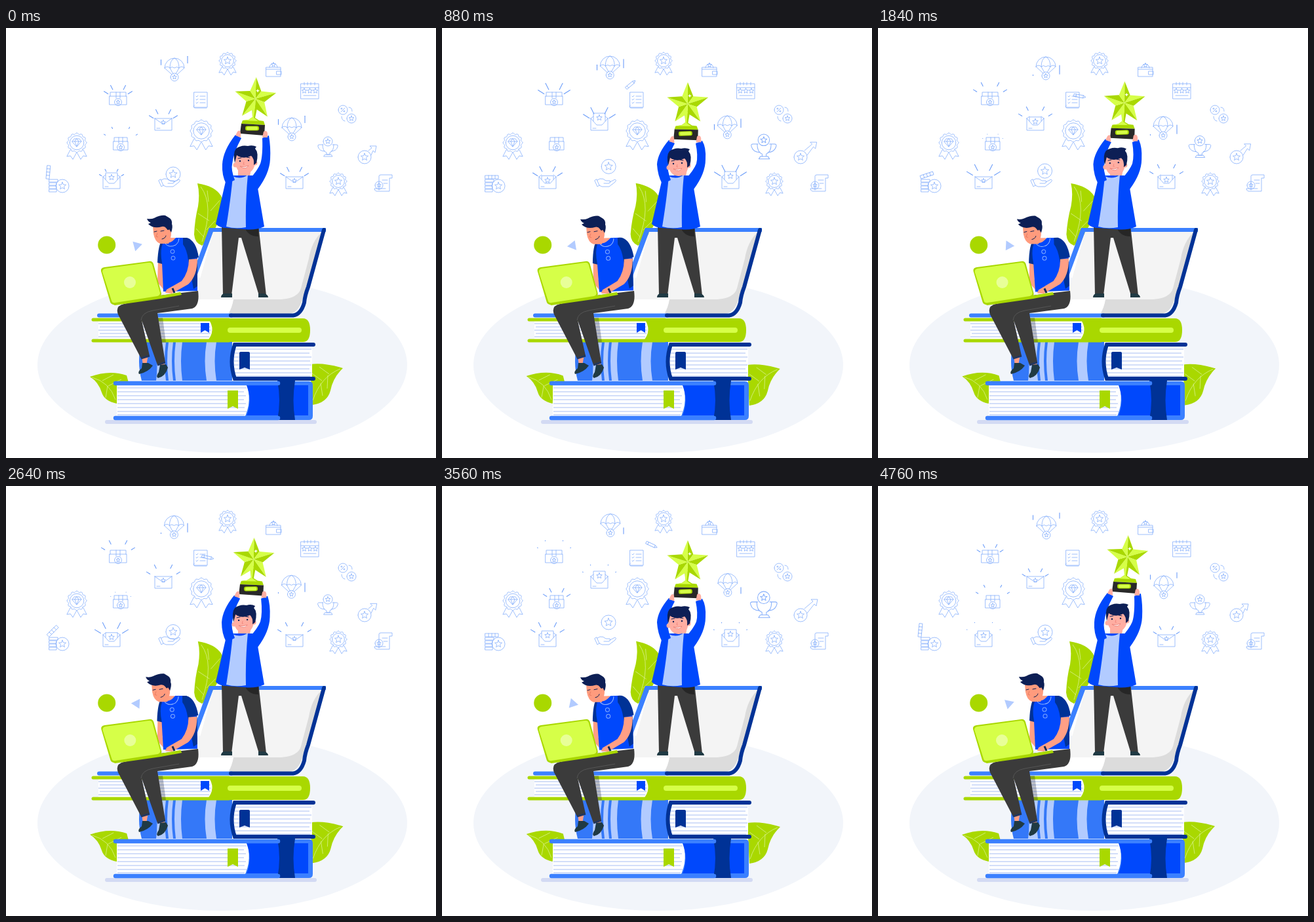
Recreate the animation shown at these times as an HTML page. Size 656 px wide and 656 px high, loop 4.8 s.

```html
<!DOCTYPE html>
<html lang="en">
<head>
<meta charset="utf-8">
<title>Learning rewards</title>
<style>
html, body { margin: 0; width: 100%; height: 100%; overflow: hidden; background: #fff; }
svg { display: block; width: 100vw; height: 100vh; }
.line { fill: none; stroke: #86affb; stroke-width: .8; stroke-linejoin: round; stroke-linecap: round; }
.ray { stroke: #6c9df9; stroke-width: 1.1; }
.blue { fill: #0048fc; } .sky { fill: #3b80ff; } .navy { fill: #003296; } .pale { fill: #b2cbff; }
.green { fill: #a9d800; } .lime { fill: #d6ff48; } .dark { fill: #3b3b3b; } .hair { fill: #0d1f55; }
.skin { fill: #ff9f85; } .pink { fill: #ffaea2; } .shoe { fill: #203a44; }
.rule { fill: none; stroke: #c5d4f8; stroke-width: 1.3; }
.vein { fill: none; stroke: #daf192; stroke-width: .8; }
.bar { fill: none; stroke-linecap: round; }
.pen { fill: none; stroke: #0d1f55; stroke-width: 1; stroke-linecap: round; }
</style>
</head>
<body>
<svg viewBox="0 0 656 656">
  <ellipse cx="330" cy="514" rx="282" ry="134" fill="#f2f5fa"/>

  <g id="leafTop">
    <path class="green" d="M292 237Q319 241 328 256Q338 275 322 300Q312 322 299 332Q288 328 287 315Q288 292 293 272Q296 252 292 237Z"/>
    <path class="vein" d="M297 242Q318 270 299 326M309 265L307 248M312 279L326 263M310 294L293 283M306 308L319 294M302 319L290 306"/>
  </g>
  <g id="leafLeft">
    <path class="green" d="M128 532Q158 521 184 530L187 541L170 545L169 573Q150 569 146 556Q141 540 128 532Z"/>
    <path class="vein" d="M131 533Q158 540 167 567M147 538L164 529M156 546L176 536M155 546L152 564"/>
  </g>
  <g id="leafRight">
    <path class="green" d="M514 519Q485 510 464 513L467 575Q490 572 495 553Q499 533 514 519Z"/>
    <path class="vein" d="M510 520Q480 532 468 568M493 528L478 517M482 538L467 527M491 530L490 550M480 542L483 561"/>
  </g>

  <path class="bar" d="M154 601H471" stroke="#d3daf3" stroke-width="6"/>

  <!-- bottom book -->
  <path fill="#fff" d="M169 543H370V594H169Z"/>
  <path class="rule" d="M170 549H367M170 555H363M170 561H366M170 567H363M170 573H366M170 579H364M170 585H367M170 590H364"/>
  <path class="sky" d="M365 539H462Q468 539 468 545V592Q468 598 462 598H362Q378 568 365 539Z"/>
  <path class="blue" d="M367 545H461V591H367Q376 568 367 545Z"/>
  <path class="navy" d="M414 538H441Q436 568 441 598H414Q420 568 414 538Z"/>
  <path class="bar" d="M167 542H415M167 595H415" stroke="#3b80ff" stroke-width="6.500"/>
  <path class="green" d="M338 553H354V581L346 577L338 581Z"/>

  <!-- middle book -->
  <path fill="#3478f8" d="M207 479H345V538H207Q199 508 207 479Z"/>
  <path class="pale" d="M226 479H244Q240 508 244 538H229Q233 508 226 479ZM248 479H255Q251 508 255 538H248Q244 508 248 479ZM259 479H269Q265 508 269 538H259Q255 508 259 479ZM306 479H321Q316 508 321 538H306Q301 508 306 479Z"/>
  <path fill="#fff" d="M345 484H467V533H345Z"/>
  <path class="rule" d="M348 490H466M348 496H463M348 502H466M348 508H464M348 514H466M348 520H463M348 526H466M348 531H464"/>
  <path class="bar" d="M469 483H349Q340 509 349 535H469" stroke="#003296" stroke-width="6"/>
  <path class="navy" d="M358 494H370Q372 494 372 496V521L364 518L356 521V496Q356 494 358 494Z"/>

  <!-- upper book -->
  <path fill="#fff" d="M141 446H316V476H141Z"/>
  <path class="rule" d="M141 451H310M143 456H312M141 461H313M143 466H312M141 471H310"/>
  <path class="green" d="M308 443H453Q464 443 464 461Q464 479 453 479H306Q322 461 308 443Z"/>
  <path class="bar" d="M133 445H340M133 477H340" stroke="#a9d800" stroke-width="5"/>
  <path class="bar" d="M342 461H447" stroke="#d6ff48" stroke-width="8"/>
  <path class="blue" d="M297 450H310V465L303.500 461L297 465Z"/>

  <!-- open book -->
  <path class="sky" d="M310 305H488V311H316L286 392L280 388Z"/>
  <path fill="#f4f4f4" d="M316 311H482L456 400Q447 414 425 416H345L285 422Z"/>
  <path fill="#dcdcdc" d="M482 311Q466 326 462 352L450 397Q446 412 420 414H346Q343 426 340 436H430Q446 436 453 412L484 314Z"/>
  <path fill="#fff" d="M285 414H347Q345 427 339 436H210Z"/>
  <path class="bar" d="M142 438.500H344" stroke="#3b80ff" stroke-width="6"/>
  <path class="bar" d="M343 438.500H438Q450 437 455 419Q456 408 461 395L485 308" stroke="#003296" stroke-width="6"/>

  <!-- winner -->
  <path class="dark" d="M329 300H385L397 408H386L359 320H355L344 408H331Z"/>
  <path fill="#262626" d="M365 306H385L385 318Q370 318 365 306Z"/>
  <path class="shoe" d="M332 405H345V411H328Q328 407 332 405ZM385 405H394Q400 407 400 411H385Z"/>
  <path class="pink" d="M354 215H374L371 232H354Z"/>
  <path class="blue" d="M336 230L348 225H376L383 238L394 303Q380 309 364 307L336 305Q326 305 320 299Z"/>
  <path class="pale" d="M346 226Q358 232 369 224Q365 265 366 304Q350 307 336 303Q343 260 346 226Z"/>
  <path id="arms" class="blue"/>
  <g id="winnerHead">
    <circle class="pink" cx="350" cy="209" r="3.500"/><circle class="pink" cx="380" cy="206" r="3.500"/>
    <path class="pink" d="M350 194H380V206Q378 221 365 222Q352 221 350 207Z"/>
    <path class="hair" d="M349 206Q346 190 351 184Q359 178 369 180Q376 178 382 181L380 184Q386 190 382 206L378 209Q379 199 374 195Q362 201 352 194Z"/>
    <circle class="hair" cx="357" cy="203" r="1.200"/><circle class="hair" cx="370" cy="202" r="1.200"/>
    <path class="pen" d="M354 199L359 198M367 197L372 198"/>
    <path d="M357 211Q364 213 370 210Q366 217 357 211Z" fill="#fff" stroke="#e8776f" stroke-width=".8"/>
    <path d="M363 204L362 208H364" fill="none" stroke="#ed8178" stroke-width=".8"/>
  </g>
  <g id="cup">
    <path class="green" d="M375 118H384L380 137L386 141L393 142L395 148L359 146L361 141L370 140L376 136Z"/>
    <path class="lime" d="M376 120H380L378 137L385 142L361 141L370 140L376 136Z"/>
    <path fill="#292929" d="M359 146L395 148L394 164L357 161Z"/>
    <rect x="365" y="149.500" width="21" height="7" rx="3" fill="#a9d800"/>
    <rect x="367" y="150.500" width="17" height="5" rx="2" fill="#d6ff48"/>
    <g id="star"></g>
    <path fill="#fff" d="M384 93l1 2 2 .5-2 1-1 2-1-2-2-1 2-.5Z"/>
    <path class="pink" d="M353 158Q357 154 358 160L358 167L350 164ZM393 158Q398 155 399 161V167L391 167Z"/>
  </g>

  <!-- student -->
  <circle class="green" cx="153.700" cy="331" r="13.500"/>
  <path id="tri" class="pale"/>
  <path fill="#202840" opacity=".3" d="M229 442H239L244 480H237Z"/>
  <path class="skin" d="M207 500L217 498L214 515H209ZM234 510L242 508L242 520H236Z"/>
  <path class="shoe" d="M208 511L217 511L224 515Q217 525 203 528Q200 525 207 519ZM235 514L244 513L247 518Q243 532 232 534Q228 532 233 525Z"/>
  <path class="dark" d="M235 408L293 401Q296 424 284 428Q255 432 231 435L243 510L231 514L207 446L219 500L206 504L171 437Q166 424 180 421Z"/>
  <path d="M206 446Q207 434 224 431L264 424" fill="none" stroke="#555"/>
  <path d="M206 504L219 500M231 514L243 510" stroke="#24375c" stroke-width="3"/>
  <g id="student">
    <path class="skin" d="M232 354L241 356L239 383L251 399L244 403L231 388Z"/>
    <path class="navy" d="M239 322Q232 330 231 358L242 361Z"/>
    <path class="skin" d="M239 320H258L260 331Q249 337 243 328Z"/>
    <path class="blue" d="M241 325Q249 332 259 320H274Q290 323 292 352L292 401L240 402L238 358Q234 337 241 325Z"/>
    <path class="navy" d="M270 320H276Q290 324 294 350L278 354Q276 338 270 330ZM278 354L292 352V394L286 398Z"/>
    <path class="skin" d="M279 353L292 352Q292 378 278 391L253 405L243 404L245 399L268 386Q279 372 279 353Z"/>
    <path fill="none" stroke="#9dbdff" d="M243 329Q249 336 259 331Q264 327 264 321"/>
    <g fill="none" stroke="#83abff"><circle cx="254" cy="341" r="3"/><circle cx="255" cy="351" r="3"/></g>
    <path d="M254 397L257 404" stroke="#102955" stroke-width="3"/>
  </g>
  <g id="studentHead">
    <path fill="#ff9b7d" d="M224 302H251Q253 314 251 320L248 329H235Q227 326 225 314Z"/>
    <path class="hair" d="M215 291Q222 292 226 290Q236 285 243 286L248 289Q254 292 253 299Q255 303 252 312L249 307Q247 310 245 306Q242 302 238 303Q225 307 217 299L221 297Q217 296 215 291Z"/>
    <path class="pen" d="M226 311L230 310M236 310L241 309M238 322Q243 321 244 317"/>
    <path d="M231 313L229 318L232 319" fill="none" stroke="#e77b62"/>
  </g>
  <g id="laptop">
    <path class="green" d="M162 421L236 408L266 403L268 407L236 413L166 423Z"/>
    <path class="green" d="M150 365L218 356Q223 355 225 360L237 405Q237 410 233 411L166 422Q160 422 159 418L145 371Q144 366 150 365Z"/>
    <path class="lime" d="M151 367L217 358Q221 357 223 361L235 404Q235 408 231 409L167 419Q162 420 161 416L147 372Q147 368 151 367Z"/>
    <circle cx="189" cy="388" r="9" fill="#e8ff98"/>
  </g>

  <g id="icons" class="line"></g>
</svg>
<script>
const LOOP = 4800, STEP = 40;
const $ = id => document.getElementById(id);
const add = (parent, tag, attrs) => {
  const el = document.createElementNS('http://www.w3.org/2000/svg', tag);
  for (const k in attrs) el.setAttribute(k, attrs[k]);
  return parent.appendChild(el);
};
const shape = (d = '', cls = 'line') => add($('icons'), 'path', { d, class: cls });
const move = (el, ...parts) => el.setAttribute('transform', parts.join(' '));
const draw = (el, d) => el.setAttribute('d', d);
const smooth = x => { x = Math.min(1, Math.max(0, x)); return x * x * (3 - 2 * x); };
const mod = (a, n) => ((a % n) + n) % n;

// Path builders
const polar = (x, y, r, deg) => {
  const a = deg * Math.PI / 180;
  return [x + r * Math.cos(a), y + r * Math.sin(a)].map(v => +v.toFixed(2));
};
const ring = (n, f) => 'M' + Array.from({ length: n }, (_, i) => f(i)).join('L') + 'Z';
const disc = (x, y, r) => `M${x - r} ${y}a${r} ${r} 0 1 0 ${2 * r} 0a${r} ${r} 0 1 0 ${-2 * r} 0`;
const box = (x, y, w, h) => `M${x} ${y}h${w}v${h}h${-w}Z`;
const star = (x, y, r) => ring(10, i => polar(x, y, i % 2 ? r * .45 : r, i * 36 - 90));
const coin = (x, y, r) => disc(x, y, r) + star(x, y, r * .58);
const badge = (x, y, r, gem) => {
  const k = r * .36;
  return ring(72, i => polar(x, y, r - 1 + Math.cos(i * Math.PI / 3), i * 5)) + disc(x, y, r * .72)
    + `M${x - r * .65} ${y + r * .7}l${-k} ${r * .7}l${k} -1l${k * .7} ${k}l${k} ${-r * .65}`
    + `M${x + r * .65} ${y + r * .7}l${k} ${r * .7}l${-k} -1l${-k * .7} ${k}l${-k} ${-r * .65}`
    + (gem ? `M${x - 7} ${y - 2}l3 -4h8l3 4l-7 8ZM${x - 7} ${y - 2}h14M${x - 3} ${y - 2}l3 8l3 -8l-3 -4Z`
           : star(x, y, r * .45));
};
const chest = (x, y, w) => box(x - w, y - 4, 2 * w, 13)
  + `M${x - w + 1} ${y - 4}v-6h${2 * w - 2}v6M${x - 3} ${y - 10}v9M${x + 3} ${y - 10}v9` + coin(x, y + 5, 5.5);
const chute = (x, y) =>
  `M${x - 15} ${y}a15 15 0 0 1 30 0q-4 -4 -8 0q-3.500 -3 -7 0q-3.500 -3 -7 0q-4 -4 -8 0`
  + `M${x - 7} ${y}q0 -12 7 -15q7 3 7 15M${x - 15} ${y}L${x - 4} ${y + 10}M${x - 7} ${y}l5 9M${x + 7} ${y}l-5 9M${x + 15} ${y}L${x + 4} ${y + 10}`
  + coin(x, y + 14, 6);
const envelope = (x, y, o) => {
  const top = y - 8, fold = `M${x - 13} ${top}L${x} ${y + 1}L${x + 13} ${top}`;
  const body = `M${x - 13} ${top}v18h26v-18M${x - 10} ${y + 7}h5`;
  if (o < .1) return body + fold + `M${x - 13} ${top}h26` + star(x, y - 2, 3.5);
  const paper = top + 2 - 10 * o;
  return body + `M${x - 13} ${top}l4 -3M${x + 13} ${top}l-4 -3M${x - 9} ${top + 4}V${paper}h18V${top + 4}`
    + `M${x - 13} ${top}L${x - 4} ${y + 2}h8L${x + 13} ${top}` + star(x, paper + 7, 4.5);
};

// Still icons
[
  badge(338, 50, 13), badge(507, 234, 13), badge(298, 157, 17, true), badge(108, 175, 15, true),
  chest(171, 108, 13), chest(175, 177, 11),
  box(397, 60, 22, 14) + 'M397 63h22M413 66h7v5h-7Z',
  box(287, 98, 20, 23) + 'M287 118q-2 4 2 4h17M290 104l1 1l2 -2M290 109l1 1l2 -2M290 114l1 1l2 -2M296 104h8M296 109h8M296 114h8',
  box(450, 85, 27, 23) + 'M450 91h27M455 83v4M460 83v4M465 83v4M471 83v4M454 103h19' + star(455, 96, 4) + star(463.5, 96, 4) + star(472, 96, 4),
  disc(514, 125, 7) + 'M511 128l6 -6' + disc(512, 123, 1) + disc(516, 127, 1) + coin(527, 138, 7) + 'M523 121q5 0 5 6M512 135q0 6 5 7',
  'M569 247V226q0 -2 3 -2h17v5h-4v20h-20q-3 -1 -3 -4h17M574 232h8M576 237h6' + coin(569, 240, 6),
  coin(86, 241, 10) + [231, 236, 241, 246].map(y => box(66, y, y < 235 ? 13 : 11, 4)).join(''),
  coin(547, 197, 10),
  'M237 232l4 -2q5 -1 9 3h6q2 2 -1 4h-8M256 235l8 -4q3 1 0 4l-9 7h-11l-4 -2M236 231l4 9l-3 2l-4 -9Z'
].forEach(d => shape(d));

// Moving icons
const chutes = [[257, 61], [436, 152]].map(([x, y]) => ({
  x, y, body: shape(chute(x, y)), left: shape('', 'line ray'), right: shape('', 'line ray')
}));
const walletCoin = shape('M402 60a6 6 0 1 1 12 0' + star(408, 56, 3.5));
const handCoin = shape(coin(255, 223, 11));
const lid = shape(box(66, 225, 20, 5) + 'M71 225v5M76 225v5M81 225v5');
const arrow = shape();
const goblet = shape('M484 178h-6q-3 0 -2 3q2 7 10 7M498 178h6q3 0 2 3q-2 7 -10 7M483 178q0 10 6 12v3h5v-3q6 -2 6 -12M485 196h13l-2 -3h-9Z' + coin(491, 173, 7));
const pencil = shape('M-9 -2H5L9 0L5 2H-9ZM-6 -2v4M5 -2v4');

const tide = t => (1 - Math.cos(t / 2400 * 2 * Math.PI)) / 2;
const hold = t => { t = mod(t, 2400); return smooth(t / 500) * (1 - smooth((t - 1600) / 800)); };
const letter = t => smooth((tide(t) - .15) * 1.5);
const envelopes = [
  [240, 146, letter],
  [161, 235, t => .4 + .4 * Math.cos(t / 1200 * 2 * Math.PI)],
  [440, 235, letter]
].map(([x, y, open]) => ({ x, y, open, el: shape() }));

// x, y, lead, duration, curve
const bursts = [
  [171, 110, 160, 535, 1], [240, 147, 160, 535, 1], [440, 235, 160, 535, 1],
  [175, 178, 560, 640, .8], [161, 235, 20, 800, .5]
].map(a => ({ a, el: shape('', 'line ray') }));

// time, x, y, angle, opacity
const pencilKeys = [
  [0, 296, 108, -40, 0], [500, 290, 95, -40, 1], [880, 288, 86, -40, 1], [1840, 308, 104, 10, 1],
  [2640, 308, 109, 12, 1], [3560, 320, 90, 25, 1], [4120, 288, 89, 90, 1], [4500, 292, 98, 60, 0], [4800, 296, 108, -40, 0]
];
const keyed = (keys, t) => {
  const i = keys.findIndex(k => k[0] > t), a = keys[i - 1], b = keys[i];
  const f = smooth((t - a[0]) / (b[0] - a[0]));
  return a.map((v, j) => v + (b[j] - v) * f);
};

// Faceted star
for (let i = 0; i < 10; i++) {
  const tip = j => polar(380.5, 108, j % 2 ? 14.5 : 33, j * 36 - 88);
  add($('star'), 'path', { d: `M380.500 108L${tip(i)}L${tip(i + 1)}Z`, class: i % 2 ? 'lime' : 'green' });
}

function dashes({ x, y, left, right }, t) {
  const fall = (el, px, lead, span, len) => {
    const p = mod(t + lead, 800) / span, y0 = y - 20 + 40 * p;
    draw(el, p < 1 ? `M${px} ${y0}V${Math.min(y + 20, y0 + len * Math.sin(Math.PI * Math.min(1, p + .2)))}` : '');
  };
  fall(left, x - 20.5, 80, 420, 8);
  fall(right, x + 20, 40, 700, 14);
}

function rays({ a: [x, y, lead, span, curve], el }, t) {
  const p = Math.pow(mod(t + lead, 800) / span, curve);
  const r0 = 18 + 12 * Math.max(0, 2 * p - 1), r1 = 18 + 12 * Math.min(1, 2 * p);
  draw(el, p < 1 ? [-148, -117, -63, -32].map(a => `M${polar(x, y, r0, a)}L${polar(x, y, r1, a)}`).join('') : '');
}

function render(t) {
  const e = tide(t), leaf = Math.pow(e, .7), d = hold(t);
  const sway = Math.abs(Math.sin(t / 1200 * Math.PI));

  move($('leafTop'), `rotate(${2.5 * leaf} 298 331)`);
  move($('leafLeft'), `rotate(${1.5 * leaf} 168 560)`);
  move($('leafRight'), `translate(${2 * leaf} ${leaf})`);

  const dx = -4 * d, dy = 8 * d;
  draw($('arms'),
    `M${350 + dx} ${163 + dy}Q${331 - 2 * d} ${187 + dy / 2} ${330 - 2 * d} 208Q329 225 336 238L349 232Q343 215 345 208Q347 190 ${359 + dx} ${168 + dy}Z` +
    `M${391 + dx} ${168 + dy}Q${392 - d} 195 388 207Q384 217 372 230L384 246Q402 222 ${403 - d} 200Q${404 - d} 182 ${401 + dx} ${164 + dy}Z`);
  move($('winnerHead'), `translate(${-4 * d} ${4 * d})`);
  move($('cup'), `translate(${dx} ${dy}) rotate(${-2 * d} 376 155)`);

  move($('student'), `rotate(${-1.5 * d} 268 402)`);
  move($('studentHead'), `translate(${-4 * d} ${.7 * d})`);
  move($('laptop'), `translate(${.7 * d} 0)`);
  draw($('tri'), ring(3, i => polar(199.5, 332, 8.7, 105 + t * 360 / LOOP + i * 120)));

  for (const c of chutes) {
    move(c.body, `translate(${-sway} ${-3.5 * leaf})`);
    dashes(c, t);
  }
  move(walletCoin, `translate(0 ${sway})`);
  move(handCoin, `translate(${-e} ${-15 * Math.pow(e, 1.4)})`);
  move(lid, `rotate(${-85 * (1 - d)} 66 230)`);
  move(goblet, `translate(491.500 181.500) scale(${1 + .33 * Math.pow(e, 1.5)}) translate(-491.500 -181.500)`);
  const ax = 565 + 8 * e, ay = 180 - 7 * e;
  draw(arrow, `M553 187L${ax - 7} ${ay + 3}l-3 -3L${ax} ${ay}l-2 10l-3 -3L557 194`);

  for (const v of envelopes) draw(v.el, envelope(v.x, v.y, v.open(t)));
  for (const b of bursts) rays(b, t);

  const [, px, py, turn, alpha] = keyed(pencilKeys, t);
  move(pencil, `translate(${px} ${py}) rotate(${turn})`);
  pencil.setAttribute('opacity', alpha);
}

const start = performance.now();
function tick() {
  const t = (performance.now() - start) % LOOP;
  render(Math.floor(t / STEP) * STEP);
  requestAnimationFrame(tick);
}
tick();
</script>
</body>
</html>
```
